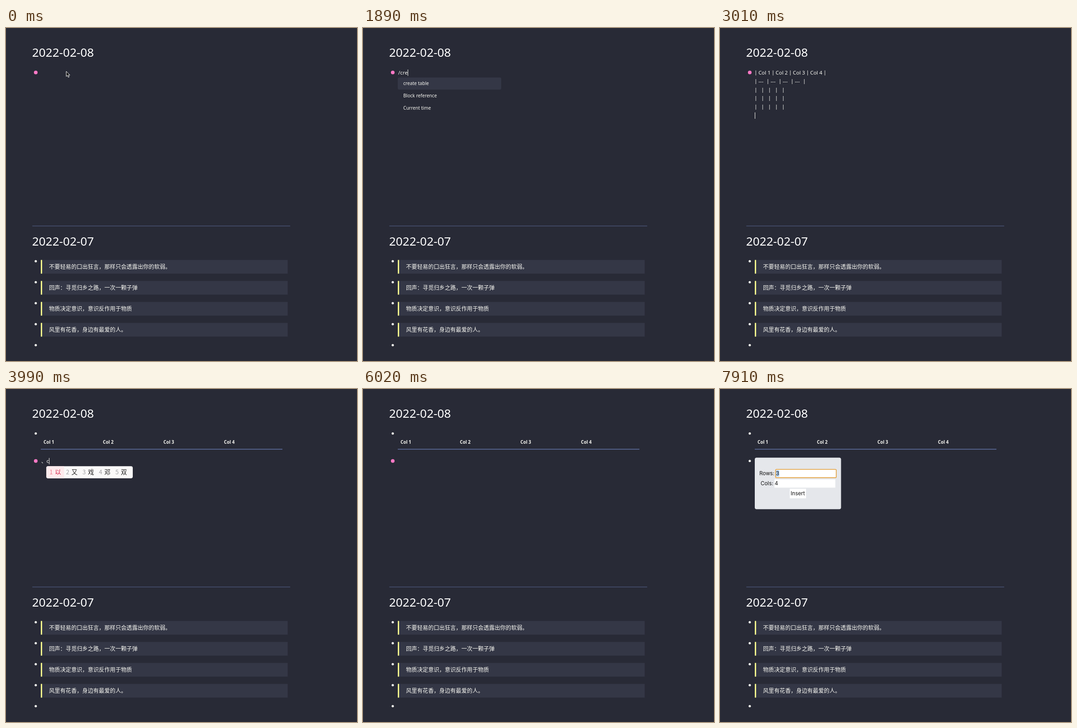
Animation, 767 px wide and 730 px high, one loop 8000 ms. Source, as an HTML page:

```html
<!DOCTYPE html>
<html lang="zh">
<head>
<meta charset="utf-8">
<title>Journal</title>
<style>
  html, body { margin: 0; width: 100%; height: 100%; overflow: hidden; background: #282a36; }
  svg { display: block; width: 100vw; height: 100vh; }
  text { fill: #f8f8f2; font-family: "Noto Sans", "Noto Sans CJK SC", sans-serif; white-space: pre; }
  .title { font-size: 25.9px; font-weight: 500; fill: #fff; }
  .body { font-size: 11.4px; }
  .bar { font-family: Roboto, sans-serif; font-size: 12px; text-anchor: middle; }
  .item { font-size: 10.1px; }
  .head { font-size: 9.7px; font-weight: 600; }
  .quote { font: 500 12.1px "Noto Sans CJK SC", sans-serif; }
  .dot { fill: #f8f8f2; }
  .dot.on { fill: #ff79c6; }
  .form text { fill: #111; font: 11.5px Inter, sans-serif; }
  .ime text { fill: #222; font: 13.2px "Noto Sans CJK SC", sans-serif; }
  .ime .num { fill: #a3a3a6; }
  .ime .pick { fill: #d4183f; }
  .ime .pick.num { fill: #ee7f90; }
</style>
</head>
<body>
<svg viewBox="0 0 767 730">
  <text class="title" x="57" y="63">2022-02-08</text>
  <text class="title" x="57" y="477">2022-02-07</text>
  <path d="M57.5 434H621" stroke="#56648f"/>
  <g id="quotes"></g>

  <g id="markup"></g>
  <g id="table">
    <path d="M76 132H604" stroke="#6272a4" stroke-width="1.6"/>
  </g>

  <circle id="dot1" class="dot" cx="65" cy="97.5"/>
  <circle id="dot2" class="dot" cx="65" cy="157.7"/>

  <g id="block">
    <text id="typed" class="body" x="77" y="102"></text>
    <g id="menu"></g>
    <g id="ime" class="ime">
      <rect x="88" y="109" width="189" height="26.5" rx="4" fill="#faf9f9"/>
      <path d="M92 109H127V135.5H92a4 4 0 0 1-4-4V113a4 4 0 0 1 4-4z" fill="#fdebed"/>
    </g>
    <g id="form" class="form">
      <rect x="76" y="90.3" width="188.5" height="113" rx="4" fill="#e5e7eb"/>
      <rect x="121" y="116" width="133" height="18" fill="#fff"/>
      <rect x="119" y="138" width="133" height="18" fill="#fff"/>
      <rect x="152.5" y="158.5" width="35.5" height="21" fill="#fff"/>
      <g id="focus">
        <rect x="122" y="118" width="7.5" height="14" fill="#b0d2f8"/>
        <rect id="ring" x="121.5" y="116" width="132.5" height="18.2" rx="2" fill="none" stroke="#e3a03c"/>
      </g>
      <text x="118.7" y="129.3" text-anchor="end">Rows:</text>
      <text x="116.3" y="151.3" text-anchor="end">Cols:</text>
      <text x="122.3" y="129.3">3</text>
      <text x="119.6" y="151.3">4</text>
      <text x="170" y="173.2" text-anchor="middle">Insert</text>
    </g>
  </g>
  <path id="caret" stroke="#f8f8f2"/>
  <path id="mouse" d="M131.7 95v11.2l2.5-2.3 1.9 4.2 1.9-.9-1.8-4h3.4z" fill="#111" stroke="#fff" stroke-width="1"/>
</svg>
<script>
const LOOP = 8000;
const $ = id => document.getElementById(id);

function add(parent, tag, attrs, text = "") {
  const el = document.createElementNS("http://www.w3.org/2000/svg", tag);
  for (const key in attrs) el.setAttribute(key, attrs[key]);
  el.textContent = text;
  parent.append(el);
  return el;
}
const label = (parent, cls, x, y, text) => add(parent, "text", { class: cls, x, y }, text);

// Older day
["不要轻易的口出狂言，那样只会透露出你的软弱。",
 "回声：寻觅归乡之路，一次一颗子弹",
 "物质决定意识，意识反作用于物质",
 "风里有花香，身边有最爱的人。", ""].forEach((line, i) => {
  const y = 508.5 + 46 * i, box = $("quotes");
  add(box, "circle", { class: "dot", cx: 65, cy: y + 2.8, r: 2.5 });
  if (!line) return;
  add(box, "rect", { x: 76, y, width: 539.5, height: 30, fill: "#343746" });
  add(box, "rect", { x: 76, y, width: 3, height: 30, fill: "#f1fa8c" });
  label(box, "quote", 94, y + 19.2, line);
});

// Table as markup: cell pitch and cell text per row
const blank = [15, () => ""];
[[37.7, n => "Col " + n], [26.5, () => "---"], blank, blank, blank].forEach(([pitch, cell], row) => {
  const y = 102 + 18.75 * row;
  for (let i = 0; i < 5; i++) {
    const x = 78.3 + pitch * i;
    label($("markup"), "bar", x, y, "|");
    if (i < 4) label($("markup"), "body", x + 5.6, y, cell(i + 1));
  }
});

[82, 211.8, 344, 476.3].forEach((x, i) => label($("table"), "head", x, 119.5, "Col " + (i + 1)));

[..."以又戏邓双"].forEach((char, i) => {
  const pick = i ? "" : "pick", x = 95 + 36 * i;
  label($("ime"), pick + " num", x, 127, i + 1);
  label($("ime"), pick, x + 12, 127, char);
});

const menus = {
  "/": ["Page reference", "Page embed", "Block reference", "Block embed", "Link",
        "Image link", "Tomorrow", "Yesterday", "Current time"],
  "/c": ["create table", "Block reference", "Current time", "Date picker", "Code block"],
  "/cr": ["create table", "Block reference", "Current time"],
};
menus["/cre"] = menus["/cr"];

const menuGroups = Object.entries(menus).map(([key, items]) => {
  const group = add($("menu"), "g", {});
  add(group, "rect", { x: 76, y: 108.5, width: 226, height: 26.5, rx: 3, fill: "#343746" });
  items.forEach((item, i) => label(group, "item", 88, 124.8 + 27.1 * i, item));
  return [key, group];
});

// [time, text in the edited block]
const strokes = [
  [0, ""], [1050, "/"], [1400, "/c"], [1540, "/cr"], [1680, "/cre"], [2030, ""],
  [3640, "、"], [3850, "、c"], [4200, "、"], [4340, ""],
  [6160, "/"], [6440, "/c"], [6580, "/cr"], [6720, "/cre"], [7140, ""],
];
// [fade in from, gone at, fade-out length]
const blinks = [[70, 700, 140], [980, 2100, 1], [2660, 4620, 140], [4970, 5530, 140], [6020, 7140, 1]];

const INSERTED = 2660, RENDERED = 3150;
const forms = [[2100, INSERTED], [7210, LOOP]];

const clamp = v => Math.max(0, Math.min(1, v));
const show = (el, on) => { el.style.display = on ? "" : "none"; };

function setDot(el, on) {
  el.classList.toggle("on", on);
  el.setAttribute("r", on ? 4 : 2.5);
}

function render(t) {
  const second = t >= RENDERED;
  const markup = t >= INSERTED && !second;
  const form = forms.find(([from, to]) => t >= from && t < to);
  const text = strokes.filter(s => s[0] <= t).pop()[1];
  const dy = second ? 60.2 : 0;

  show($("mouse"), t < 1050);
  show($("markup"), markup);
  show($("table"), second);
  show($("dot2"), second);
  setDot($("dot1"), !second && !form);
  setDot($("dot2"), !form);

  $("block").setAttribute("transform", `translate(0 ${dy})`);
  $("typed").textContent = text;
  menuGroups.forEach(([key, group]) => show(group, key === text));
  show($("ime"), text === "、c");

  show($("form"), form);
  if (form) {
    const p = clamp((t - form[0] - 210) / 140);
    $("focus").style.opacity = p;
    $("ring").setAttribute("stroke-width", 5 - 3.4 * p);
  }

  const x = text ? 77.5 + $("typed").getComputedTextLength() : 76.5;
  const y = markup ? 185 : 91 + dy;
  $("caret").setAttribute("d", `M${x} ${y}v14`);
  $("caret").style.opacity = Math.max(...blinks.map(([from, to, out]) =>
    clamp(Math.min((t - from) / 140, (to - t) / out))));
}

const start = performance.now();
function tick() {
  render((performance.now() - start) % LOOP);
  requestAnimationFrame(tick);
}
tick();
</script>
</body>
</html>
```
